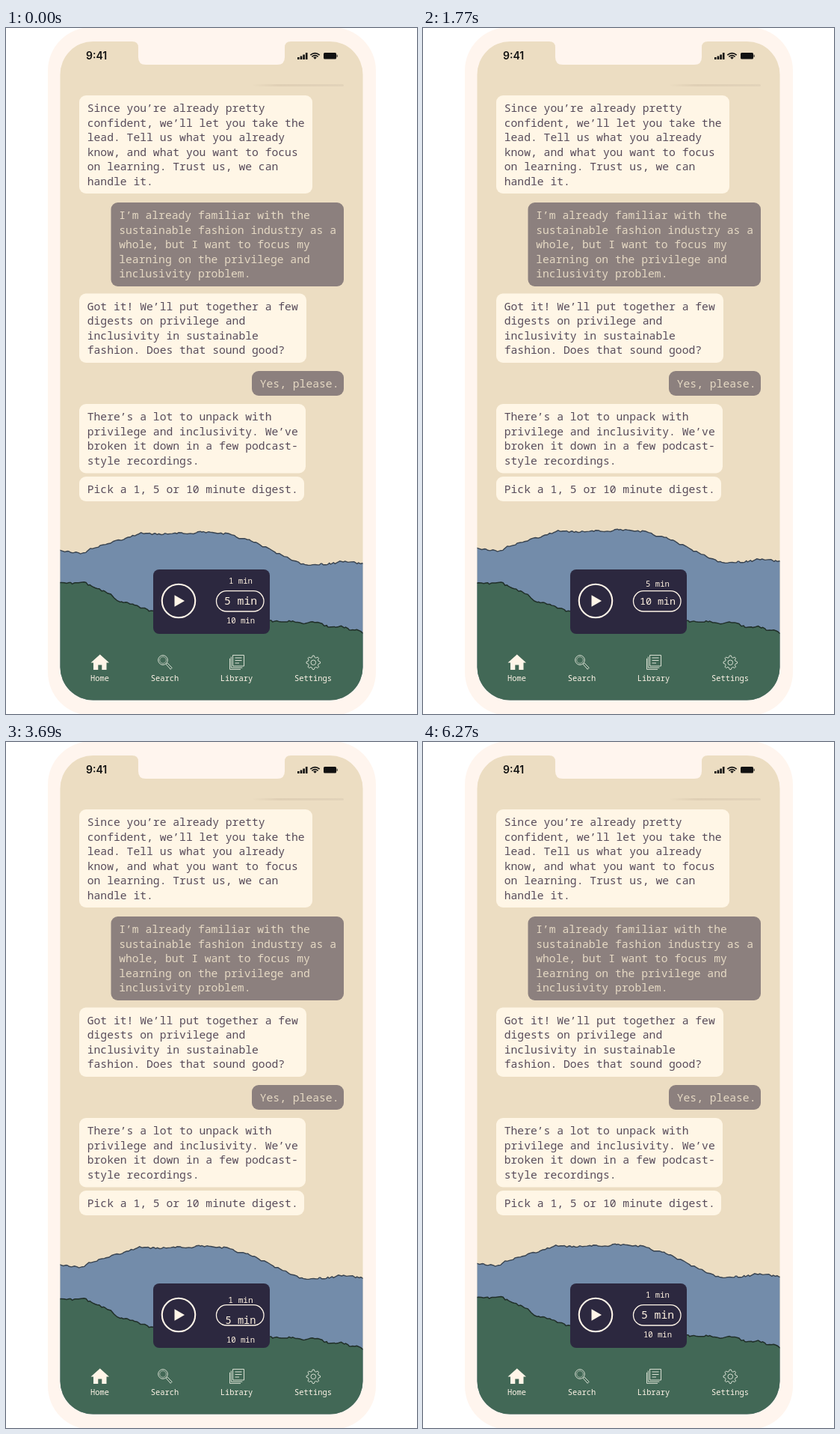
These frames come from a looping animation (550x916 px, 6300 ms). An HTML page:

```html
<!DOCTYPE html>
<html lang="en">
<head>
<meta charset="utf-8">
<title>Digest picker</title>
<style>
html, body { margin: 0; width: 100%; height: 100%; overflow: hidden; background: #fff; }
svg { display: block; width: 100vw; height: 100vh; }
text { font-family: "Noto Sans Mono", "DejaVu Sans Mono", monospace; }
.chat { font-size: 14.7px; }
.nav { font-size: 10.4px; fill: #fff5e8; text-anchor: middle; }
.item { fill: #fff2e0; text-anchor: middle; }
.line { fill: none; stroke: #fff5e8; }
.icon { fill: none; stroke: #d9e0d3; stroke-width: 1; }
</style>
</head>
<body>
<svg viewBox="0 0 550 916">
  <defs>
    <clipPath id="screen"><rect x="72.5" y="18" width="405" height="879.5" rx="44"/></clipPath>
    <clipPath id="panel"><rect x="197" y="723" width="156" height="86" rx="8"/></clipPath>
    <linearGradient id="fade">
      <stop offset="0" stop-color="#dfcfb5" stop-opacity="0"/>
      <stop offset=".3" stop-color="#dfcfb5"/>
      <stop offset="1" stop-color="#e2d3ba"/>
    </linearGradient>
  </defs>
  <rect x="56" y="-1" width="439" height="919" rx="58" fill="#fff5ee"/>
  <g clip-path="url(#screen)">
    <rect x="72" y="18" width="406" height="880" fill="#ecddc2"/>
    <rect x="329" y="75" width="123" height="3" rx="1.5" fill="url(#fade)"/>
    <g id="chat"></g>
    <path id="blue" fill="#738caa" stroke="#39434f" stroke-width="1.4"/>
    <path id="green" fill="#426856" stroke="#202f29" stroke-width="1.5"/>
  </g>
  <path fill="#fff5ee" d="M169 17H381V18Q373 18 373 26V39Q373 49 363 49H187Q177 49 177 39V26Q177 18 169 18Z"/>

  <text x="107" y="42" style="font:600 14px Inter,sans-serif" fill="#111">9:41</text>
  <g fill="#111">
    <path d="M390 39h2.6v3h-2.6zM393.7 37.5h2.6v4.5h-2.6zM397.3 35.5h2.6v6.5h-2.6zM400.9 33h2.6v9h-2.6z"/>
    <path d="M411.2 39.4a3.5 3.5 0 0 1 4.6 0l-2.3 2.4z"/>
    <rect x="425" y="33" width="17" height="8.6" rx="1.5"/>
    <rect x="442.6" y="35.7" width="1" height="3.2"/>
    <path fill="none" stroke="#111" stroke-width="1.7" d="M407.3 36.2q6.2-5 12.4 0M409.4 38.4q4.1-3.4 8.2 0"/>
  </g>

  <g clip-path="url(#panel)">
    <rect x="197" y="723" width="156" height="86" fill="#2c283f"/>
    <circle class="line" cx="231" cy="765" r="22.2" stroke-width="2.1"/>
    <path fill="#fff5e8" d="M225.5 757.3L239 765L225.5 772.7Z"/>
    <rect class="line" x="281.5" y="751.7" width="63.5" height="27.3" rx="13.6" stroke-width="1.3"/>
    <g id="items"></g>
  </g>

  <path fill="#fff5e8" d="M125.8 836.5L138 847.5H134.5V857H128.3V850.5H123.3V857H117V847.5H113.5Z"/>
  <g class="icon">
    <circle cx="210" cy="844" r="6.3"/>
    <circle cx="210" cy="844" r="4.3" stroke-opacity=".6"/>
    <path d="M214 849.3l1.8-1.6 6.3 6.6-1.9 2z"/>
    <path d="M303.5 837.5h15v14.5h-15zM301.3 839.5v14.7h15M299.5 841.8v14.6h14.5M306.5 841h9M306.5 844.5h9M306.5 848h5.5"/>
    <circle cx="411.3" cy="847.3" r="3.3"/>
    <path id="gear"/>
  </g>
  <text class="nav" x="125.5" y="871.5">Home</text>
  <text class="nav" x="212.5" y="871.5">Search</text>
  <text class="nav" x="308.5" y="871.5">Library</text>
  <text class="nav" x="411" y="871.5">Settings</text>
</svg>
<script>
const $ = id => document.getElementById(id);
const LOOP = 6300;

function add(parent, tag, attrs, text = '') {
  const el = document.createElementNS('http://www.w3.org/2000/svg', tag);
  for (const k in attrs) el.setAttribute(k, attrs[k]);
  el.textContent = text;
  return parent.appendChild(el);
}

function bubble(x, y, width, height, lines, mine) {
  add($('chat'), 'rect', { x, y, width, height, rx: 9, fill: mine ? '#8c807e' : '#fff6e6' });
  lines.forEach((s, i) => add($('chat'), 'text', {
    class: 'chat', x: x + 10.7, y: y + 22 + i * 19.6, fill: mine ? '#e6d9c4' : '#574b5a'
  }, s));
}
bubble(98, 90, 312, 131, ['Since you’re already pretty', 'confident, we’ll let you take the',
  'lead. Tell us what you already', 'know, and what you want to focus', 'on learning. Trust us, we can', 'handle it.']);
bubble(140.5, 233, 311.5, 112, ['I’m already familiar with the', 'sustainable fashion industry as a',
  'whole, but I want to focus my', 'learning on the privilege and', 'inclusivity problem.'], true);
bubble(98, 354.5, 304, 92.5, ['Got it! We’ll put together a few', 'digests on privilege and',
  'inclusivity in sustainable', 'fashion. Does that sound good?']);
bubble(329, 458, 123, 33, ['Yes, please.'], true);
bubble(98, 502, 303, 92.5, ['There’s a lot to unpack with', 'privilege and inclusivity. We’ve',
  'broken it down in a few podcast-', 'style recordings.']);
bubble(98, 599, 301, 33, ['Pick a 1, 5 or 10 minute digest.']);

// Gear outline: eight teeth, four corners each
let gear = '';
for (let i = 0; i < 32; i++) {
  const a = (i - .5) * Math.PI / 16, r = i % 4 < 2 ? 9.3 : 7;
  gear += (i ? 'L' : 'M') + (411.3 + r * Math.cos(a)) + ' ' + (847.3 + r * Math.sin(a));
}
$('gear').setAttribute('d', gear + 'Z');

// Value at t from [time, value] keys
function track(keys, t, ease) {
  let i = 1;
  while (i < keys.length - 1 && t > keys[i][0]) i++;
  const [t0, a] = keys[i - 1], [t1, b] = keys[i];
  const p = Math.min(1, Math.max(0, (t - t0) / (t1 - t0)));
  return a + (b - a) * (ease ? ease(p) : p);
}
const smooth = p => p * p * (3 - 2 * p);

// Torn paper edge: a coarse profile roughened with seeded noise
function ridge(profile, seed) {
  const rand = () => (seed = seed * 16807 % 2147483647) / 2147483647;
  let d = 'M50 960';
  for (let x = 50; x <= 500; x += 1.5 + rand() * 3)
    d += `L${x.toFixed(1)} ${(track(profile, x) + (rand() - .5) * 2.2).toFixed(1)}`;
  return d + 'L510 960Z';
}
$('blue').setAttribute('d', ridge([[50, 697], [72, 698], [103, 702], [112, 696], [140, 687], [155, 683],
  [182, 674], [200, 676], [232, 674.5], [245, 676], [262, 672.5], [280, 675], [300, 675], [312, 681],
  [330, 685], [360, 700], [380, 709], [403, 718], [418, 716], [435, 715.5], [450, 712], [477, 715], [500, 717]], 41));
$('green').setAttribute('d', ridge([[50, 741], [90, 741.5], [105, 740], [115, 746], [138, 755], [150, 765],
  [165, 768], [195, 779], [300, 788], [353, 792], [385, 792], [400, 795], [412, 792.5], [425, 797],
  [437, 801], [447, 798], [460, 803], [470, 804], [477, 807], [500, 812]], 97));

const blueX = [[0, 0], [660, -1], [1770, 0], [2520, 4], [3690, -2], [5280, -1], [6270, -3]];
const blueY = [[0, 0], [660, 0], [1320, -1.2], [1770, -3], [2520, -3], [3000, -1.4], [3690, 0],
  [4620, -2], [5280, -2], [5700, -1], [6270, -2]];
const greenY = [[0, 0], [660, 0], [1770, .3], [2520, 1.5], [3690, 3], [5280, 2], [6270, .8]];

// Picker: centre and font size of each option with 5, 10 or 1 chosen
const items = [
  { label: '1 min', y: [738, 714, 763.5], size: [10.6, 10.6, 12.9] },
  { label: '5 min', y: [765, 742, 793], size: [14.7, 10.6, 10.6] },
  { label: '10 min', y: [791, 765, 817], size: [10.6, 13.4, 10.6] }
];
for (const it of items) it.el = add($('items'), 'text', { class: 'item' }, it.label);
const stops = [[0, 0], [950, 0], [1550, 1], [1850, 1], [2500, 2], [3270, 2], [3900, 3], [LOOP, 3]];

function draw(now) {
  const t = now % LOOP;
  const shift = (id, x, y) => $(id).setAttribute('transform', `translate(${x} ${y})`);
  shift('blue', track(blueX, t, smooth), track(blueY, t, smooth));
  shift('green', 0, track(greenY, t, smooth));

  const s = track(stops, t, smooth), i = Math.floor(s);
  const mix = v => v[i % 3] + (v[(i + 1) % 3] - v[i % 3]) * (s - i);
  for (const it of items) {
    const size = mix(it.size);
    it.el.setAttribute('x', 314);
    it.el.setAttribute('y', mix(it.y) + size * .36);
    it.el.setAttribute('font-size', size);
  }
}

let start;
function tick(now) {
  start ??= now;
  draw(now - start);
  requestAnimationFrame(tick);
}
draw(0);
requestAnimationFrame(tick);
</script>
</body>
</html>
```
